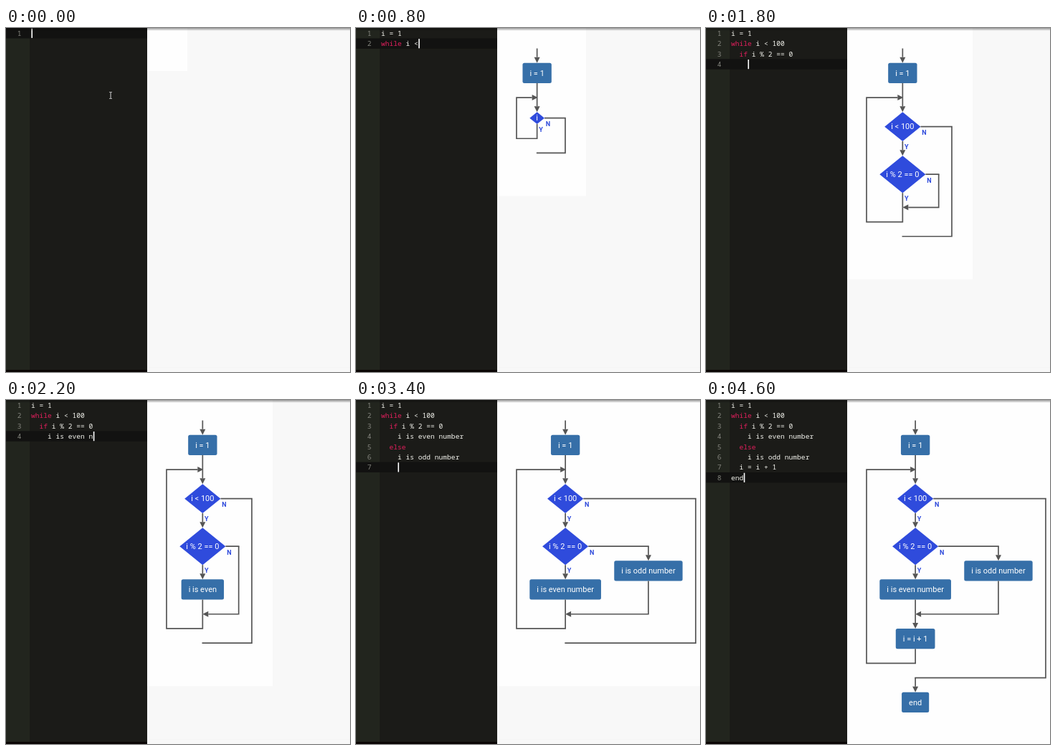
Recreate the animation shown at these times as an HTML page with a canvas. Size 480 by 480 pixels, loop 4.8 s.

```html
<!DOCTYPE html>
<html>
<head>
<meta charset="utf-8">
<style>
html, body { margin: 0; width: 100%; height: 100%; overflow: hidden; background: #f8f8f8; }
canvas { display: block; }
</style>
</head>
<body>
<canvas id="stage" width="480" height="480"></canvas>
<script>
const ctx = document.getElementById('stage').getContext('2d');
const script = `i = 1
while i < 100
  if i % 2 == 0
    i is even number
  else
    i is odd number
  i = i + 1
end`;

// Characters typed at each step
const STEP = 200;
const typed = [0, 4, 5, 9, 15, 18, 24, 29, 33, 36, 46, 51, 57, 60, 64, 73, 77, 84, 88, 90, 92, 95, 96, 99];

const EDITOR = 197, GUTTER = 33, ROW = 14.43, CHAR = 5.76, CODE_X = 35;
const LEFT = 224, START = 28.5, GAP = 20.2, BOX = 28.2, SIDE = 18.3, SKEW = 0.81;
const MONO = '9.6px "Noto Sans Mono", "DejaVu Sans Mono", monospace';
const SANS = '11px Roboto, "Open Sans", sans-serif';
const BOLD = 'bold 9px Roboto, "Open Sans", sans-serif';
const INK = '#555', BLUE = '#2f4bdc', STEEL = '#366fa8';

function rect(color, x, y, w, h) {
  ctx.fillStyle = color;
  ctx.fillRect(x, y, w, h);
}

function text(str, x, y, color, font, align, baseline) {
  ctx.font = font;
  ctx.fillStyle = color;
  ctx.textAlign = align;
  ctx.textBaseline = baseline;
  ctx.fillText(str, x, y);
}

function width(str) {
  ctx.font = SANS;
  return ctx.measureText(str).width;
}

function line(...pts) {
  ctx.strokeStyle = INK;
  ctx.lineWidth = 1.7;
  ctx.beginPath();
  pts.forEach(p => ctx.lineTo(...p));
  ctx.stroke();
}

function shape(color, ...pts) {
  ctx.fillStyle = color;
  ctx.beginPath();
  pts.forEach(p => ctx.lineTo(...p));
  ctx.fill();
}

// Polyline with a head at its last point
function arrow(...pts) {
  const [x, y] = pts[pts.length - 1], [px, py] = pts[pts.length - 2];
  const dx = Math.sign(x - px), dy = Math.sign(y - py);
  const bx = x - 8 * dx, by = y - 8 * dy;
  line(...pts.slice(0, -1), [bx, by]);
  shape(INK, [x, y], [bx + 4 * dy, by + 4 * dx], [bx - 4 * dy, by - 4 * dx]);
}

function indentOf(row) {
  return row.search(/\S|$/);
}

function parse(src) {
  const root = [], stack = [{ indent: -1, list: root }];
  for (const row of src.split('\n')) {
    const word = row.trim(), indent = indentOf(row);
    if (!word) continue;
    while (stack[stack.length - 1].indent >= indent) stack.pop();
    const { list } = stack[stack.length - 1];
    if (word === 'else') {
      stack.push({ indent, list: list[list.length - 1].alt });
      continue;
    }
    const [, kind, test] = word.match(/^(while|if)\s+(.*)$/) || [];
    const node = { kind, label: kind ? test : word, body: [], alt: [] };
    list.push(node);
    if (kind) stack.push({ indent, list: node.body });
  }
  return root;
}

// Extents to the left and right of the centre line
function measure(list) {
  let left = 0, right = 0;
  for (const n of list) {
    n.half = (width(n.label) + (n.kind ? 18 : 20)) / 2;
    n.left = n.right = n.half;
    if (n.kind) {
      const body = measure(n.body), alt = measure(n.alt);
      n.left = Math.max(n.half, body.left);
      const inner = Math.max(n.half, body.right);
      if (n.kind === 'while') {
        n.left += SIDE;
        n.right = Math.max(n.half + 29, body.right + SIDE);
      } else {
        n.branch = inner + SIDE + alt.left;
        n.right = n.branch + alt.right;
      }
    }
    left = Math.max(left, n.left);
    right = Math.max(right, n.right);
  }
  return { left, right };
}

function diamond(n, c, top) {
  const h = n.half * SKEW, y = top + h;
  shape(BLUE, [c, top], [c + n.half, y], [c, y + h], [c - n.half, y]);
  text(n.label, c, y + 0.5, '#fff', SANS, 'center', 'middle');
  text('Y', c + 5.5, y + h + 8.7, BLUE, BOLD, 'center', 'middle');
  text('N', c + n.half + 5, y + 8.7, BLUE, BOLD, 'center', 'middle');
  return y;
}

function drawBox(n, c, y) {
  arrow([c, y], [c, y + GAP]);
  ctx.fillStyle = STEEL;
  ctx.beginPath();
  ctx.roundRect(c - n.half, y + GAP, n.half * 2, BOX, 2.5);
  ctx.fill();
  text(n.label, c, y + GAP + BOX / 2 + 0.5, '#fff', SANS, 'center', 'middle');
  return y + GAP + BOX;
}

function drawWhile(n, c, y) {
  const top = y + GAP;
  line([c, y], [c, top]);
  arrow([c, top], [c, top + GAP]);
  const mid = diamond(n, c, top + GAP);
  const end = draw(n.body, c, mid + n.half * SKEW);
  const back = end + GAP, out = back + GAP;
  arrow([c, end], [c, back], [c - n.left, back], [c - n.left, top], [c + 1, top]);
  line([c + n.half, mid], [c + n.right, mid], [c + n.right, out], [c - 0.8, out]);
  return out;
}

function drawIf(n, c, y) {
  arrow([c, y], [c, y + GAP]);
  const mid = diamond(n, c, y + GAP);
  const end = draw(n.body, c, mid + n.half * SKEW);
  const x = c + n.branch;
  line([c + n.half, mid], [x, mid], [x, mid + 1]);
  const altEnd = draw(n.alt, x, mid);
  const join = Math.max(end, altEnd) + GAP;
  line([c, end], [c, join]);
  arrow([x, altEnd], [x, join], [c, join]);
  return join;
}

function draw(list, c, y) {
  for (const n of list) {
    y = (n.kind === 'while' ? drawWhile : n.kind ? drawIf : drawBox)(n, c, y);
  }
  return y;
}

function drawChart(src) {
  const flow = parse(src), { left, right } = measure(flow);
  const c = LEFT + left, end = draw(flow, c, START);
  ctx.globalCompositeOperation = 'destination-over';
  rect('#fefefe', EDITOR, 0, c + right + 29 - EDITOR, flow.length ? end + 60 : 60);
  rect('#f5f5f5', EDITOR, 473, 283, 1);
  rect('#f8f8f8', EDITOR, 0, 283, 480);
  ctx.globalCompositeOperation = 'source-over';
}

function drawEditor(src) {
  const rows = src.split('\n'), last = rows.length - 1;
  rect('#1b1b18', 0, 0, EDITOR, 480);
  rect('#22251e', 0, 0, GUTTER, 480);
  rect('#121211', 0, last * ROW, EDITOR, ROW);
  rows.forEach((row, i) => {
    const y = 10.8 + i * ROW, pad = indentOf(row), x = CODE_X + pad * CHAR;
    const [key] = row.trim().match(/^(while|if|else)\b/) || [''];
    text(i + 1, 21.5, y, '#85867f', MONO, 'right', 'alphabetic');
    text(key, x, y, '#e01f5c', MONO, 'left', 'alphabetic');
    text(row.slice(pad + key.length), x + key.length * CHAR, y, '#f4f4ee', MONO, 'left', 'alphabetic');
  });
  rect('#fff', CODE_X + rows[last].length * CHAR + 0.4, last * ROW + 0.7, 1.6, 13.2);
  rect('#0b0605', 0, 477, EDITOR, 3);
}

function drawPointer(x, y) {
  rect('#aaa', x - 0.6, y - 4, 1.3, 8);
  for (const dy of [-5, 4]) rect('#aaa', x - 2, y + dy, 4, 1);
}

function drawShadow() {
  const g = ctx.createLinearGradient(0, 0, 0, 4);
  g.addColorStop(0, 'rgba(0,0,0,.4)');
  g.addColorStop(1, 'rgba(0,0,0,0)');
  rect(g, 0, 0, 480, 4);
}

function frame() {
  const step = Math.floor(performance.now() / STEP) % typed.length;
  let src = script.slice(0, typed[step]);
  // The chart trails by one key until a line is complete
  const done = (script + '\n').startsWith(src + '\n');
  const chart = done ? src : src.slice(0, -1);
  if (src.endsWith('\n')) {
    const prev = src.trimEnd().split('\n').pop();
    src += ' '.repeat(indentOf(prev) + (/^\s*(while|if|else)\b/.test(prev) ? 2 : 0));
  }
  ctx.clearRect(0, 0, 480, 480);
  drawChart(chart);
  drawEditor(src);
  if (step === 0) drawPointer(146, 94);
  drawShadow();
  requestAnimationFrame(frame);
}
frame();
</script>
</body>
</html>
```
